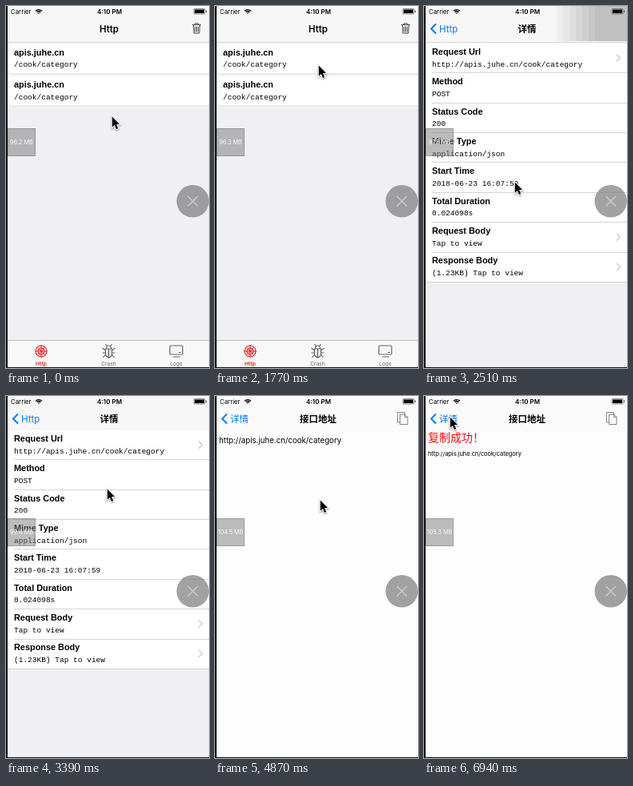
Write an HTML page with a canvas that moves like this. It is 254 px wide and 453 px high and loops after 7.99 s.

```html
<!DOCTYPE html>
<html lang="zh">
<head>
<meta charset="utf-8">
<title>Http inspector</title>
<style>
html, body { margin: 0; width: 100%; height: 100%; overflow: hidden; background: #000; }
canvas { display: block; width: 254px; height: 453px; }
</style>
</head>
<body>
<canvas></canvas>
<script>
const W = 254, H = 453, LOOP = 7990, STEP = 147.8;
const canvas = document.querySelector('canvas');
const c = canvas.getContext('2d');
const ratio = Math.max(1, window.devicePixelRatio || 1);
canvas.width = W * ratio;
canvas.height = H * ratio;

const UI = 'Inter, "Noto Sans CJK SC", "Noto Sans CJK", sans-serif';
const BOLD = 'bold 10.9px "Liberation Sans", sans-serif';
const MONO = '9.5px "Liberation Mono", monospace';
const BLUE = '#007aff', RED = '#e3261c', GRAY = '#666', LINE = '#d5d5d8';
const url = 'http://apis.juhe.cn/cook/category';

const details = [
  ['Request Url', url, true],
  ['Method', 'POST'],
  ['Status Code', '200'],
  ['Mime Type', 'application/json'],
  ['Start Time', '2018-06-23 16:07:59'],
  ['Total Duration', '0.024098s'],
  ['Request Body', 'Tap to view', true],
  ['Response Body', '(1.23KB) Tap to view', true]
];

// Places the pointer visits, as [step, x, y].
const stops = [
  [-1, 132, 137], [5, 46, 66], [11, 129, 73], [12, 129, 73], [16, 113, 219],
  [22, 126, 115], [27, 139, 66], [32, 131, 129], [39, 231, 28], [46, 32, 25]
];

const ramp = (k, from, to) => Math.max(0, Math.min(1, (k - from) / (to - from)));
const smooth = f => f * f * (3 - 2 * f);
const push = (k, start) => 1 - (1 - ramp(k, start, start + 3)) ** 2;

// Dragged up, then springing back to rest.
const scrollAt = k => Math.round(Math.max(0, Math.min(12 * (k - 17), 16 * 2 ** (20 - k))));

const memoryAt = k => 96.2 + .1 * ramp(k, 0, 4) + 3.1 * ramp(k, 12, 20)
  + 5.1 * ramp(k, 24, 32) + .8 * ramp(k, 36, 42);

function pointerAt(k) {
  const i = Math.max(1, stops.findIndex(stop => stop[0] >= k));
  const [from, x, y] = stops[i - 1], [to, nextX, nextY] = stops[i];
  const f = smooth(ramp(k, from, to));
  return [x + (nextX - x) * f, y + (nextY - y) * f];
}

function rect(x, y, w, h, color) {
  c.fillStyle = color;
  c.fillRect(x, y, w, h);
}

function text(str, x, y, font, color = '#000', align = 'left') {
  c.font = font;
  c.fillStyle = color;
  c.textAlign = align;
  c.fillText(str, x, y);
}

function stroke(path, color, width = 1) {
  c.strokeStyle = color;
  c.lineWidth = width;
  c.stroke(new Path2D(path));
}

function box(x, y, w, h, radius, color, width = 1) {
  c.strokeStyle = color;
  c.lineWidth = width;
  c.beginPath();
  c.roundRect(x, y, w, h, radius);
  c.stroke();
}

function arc(x, y, r, from, to, color, width) {
  c.strokeStyle = color;
  c.lineWidth = width;
  c.beginPath();
  c.arc(x, y, r, from, to);
  c.stroke();
}

function group(x, y, alpha, paint) {
  c.save();
  c.translate(x, y);
  c.globalAlpha *= alpha;
  paint();
  c.restore();
}

function radarIcon(color) {
  for (const r of [7, 4]) arc(0, 0, r, 0, 7, color, 1.2);
  for (let i = 0; i < 8; i++) {
    c.rotate(Math.PI / 4);
    stroke(i % 2 ? 'M0 0H8' : 'M0 0H5', color);
  }
}

function bugIcon(color) {
  for (const side of [1, -1]) {
    c.save();
    c.scale(side, 1);
    stroke('M0-3H4V3Q4 7 0 8V-3M0-7Q3-7 3-3M2-6L4-9M4-1L8-4M4 2H8M4 4L7 8', color, 1.2);
    c.restore();
  }
}

function screenIcon(color) {
  box(-8, -7, 16, 11, 1, color, 1.2);
  stroke('M-4 7H5M3 1.5H6', color, 1.2);
}

function trashIcon() {
  stroke('M233 23.5H244M236.5 23V21.8H240.5V23M234.5 24L235 34H242L242.5 24', '#4a4a4a');
  for (let x = 236.6; x < 241; x += 1.9) stroke(`M${x} 25.5V32.5`, '#4a4a4a');
}

function copyIcon() {
  stroke('M231.5 23H237.5L241 26.5V35.5H231.5ZM237.5 23V26.5H241M231 33H228.5V20.5H237.5V23', '#666', .8);
}

function tab(x, label, color, weight, icon) {
  group(x, 432, 1, () => icon(color));
  text(label, x, 449.5, `${weight} 6.7px ${UI}`, color, 'center');
}

function row(y, title, detail, arrow) {
  text(title, 10, y + 14.5, BOLD);
  text(detail, 10, y + 29, MONO);
  if (arrow) stroke(`M241 ${y + 14}l4.5 4.5-4.5 4.5`, '#c4c4c9', 1.2);
}

function listPage() {
  rect(0, 0, W, H, '#efeff4');
  rect(0, 45, W, 1, LINE);
  for (const y of [47, 87.5]) {
    rect(0, y, W, 37, '#fff');
    rect(0, y + 37, W, 1, '#e6e6e8');
    row(y, 'apis.juhe.cn', '/cook/category');
  }
  rect(0, 418, W, 35, '#f8f8f8');
  rect(0, 418, W, 1, '#bcbcbe');
  tab(44, 'Http', RED, 600, radarIcon);
  tab(128.5, 'Crash', GRAY, 400, bugIcon);
  tab(213, 'Logs', GRAY, 400, screenIcon);
}

function detailPage(offset) {
  const top = 46.5 - offset, height = 37.35;
  rect(0, 0, W, H, '#efeff4');
  rect(0, top - .5, W, height * 8, '#fff');
  rect(0, top - 1.5, W, 1, LINE);
  details.forEach((item, i) => {
    const y = top + height * i;
    row(y, ...item);
    rect(i < 7 ? 10 : 0, Math.round(y + height - .45), W, 1, LINE);
  });
}

function urlPage(copied) {
  rect(0, 0, W, H, '#fdfdfd');
  if (copied) text('复制成功！', 5, 57, `500 14px ${UI}`, '#fb0d0d');
  text(url, 5, copied ? 75 : 58.5, `${copied ? 7.4 : 9.7}px ${UI}`);
}

function navItems(title, back, icon, shift, alpha) {
  group(0, 0, alpha, () => {
    text(title, 129 + shift, 32.5, `600 11.5px ${UI}`, '#000', 'center');
    if (back) {
      stroke('M15 22.5L9 28.5L15 34.5', BLUE, 2);
      text(back, 19 + shift * .4, 32.5, `11.5px ${UI}`, BLUE);
    }
    if (icon) icon();
  });
}

function navBar(push1, push2) {
  rect(0, 0, W, 45, 'rgba(251,251,251,.7)');
  navItems('Http', '', trashIcon, -100 * push1, 1 - push1);
  navItems('详情', 'Http', null, 110 * (1 - push1) - 100 * push2, push1 * (1 - push2));
  navItems('接口地址', '详情', copyIcon, 110 * (1 - push2), push2);
}

// Stepped shade left in the bar while the page settles.
function navShade() {
  for (let x = 166; x < 220; x += 8) rect(x, 0, W - x, 44, 'rgba(0,0,0,.034)');
}

function statusBar() {
  text('Carrier', 6, 9.8, `7.8px ${UI}`);
  for (const r of [1, 3.2, 5.4]) arc(41, 10, r, -2.4, -.74, '#000', 1.4);
  text('4:10 PM', 129.5, 9.8, `600 8px ${UI}`, '#000', 'center');
  box(235, 3.5, 14, 6.5, 1, '#555', .7);
  rect(236, 4.5, 12, 4.5, '#000');
  rect(250, 5.5, 1, 2.5, '#555');
}

function overlays(k) {
  rect(2, 153, 35, 35, 'rgba(128,128,128,.53)');
  box(2.5, 153.5, 34, 34, 0, 'rgba(110,110,110,.4)');
  text(memoryAt(k).toFixed(1) + ' MB', 19.5, 173.2, `7.3px ${UI}`, '#f8f8f8', 'center');
  c.fillStyle = 'rgba(128,128,128,.73)';
  c.beginPath();
  c.arc(233.7, 244.3, 20.3, 0, 7);
  c.fill();
  stroke('M227.5 238L240 250.5M240 238L227.5 250.5', '#c8c8c8', 1.6);
}

function pointer(x, y) {
  group(x + .8, y + 1.5, 1, () => {
    const shape = new Path2D('M0 0V13.2L3 10.4L5.2 15.5L7.4 14.6L5.3 9.6H9.3Z');
    c.shadowColor = 'rgba(0,0,0,.45)';
    c.shadowBlur = 2 * ratio;
    c.shadowOffsetY = ratio;
    c.strokeStyle = '#fff';
    c.lineWidth = 2;
    c.stroke(shape);
    c.shadowColor = 'transparent';
    c.fillStyle = '#000';
    c.fill(shape);
  });
}

function draw(time) {
  const k = Math.max(-1, Math.min(46, Math.floor((time % LOOP - 120) / STEP)));
  const push1 = push(k, 12), push2 = push(k, 28);
  c.setTransform(ratio, 0, 0, ratio, 0, 0);

  if (push1 < 1) group(-76 * push1, 0, 1, listPage);
  if (push1 > 0 && push2 < 1)
    group(W * (1 - push1) - 76 * push2, 0, 1, () => detailPage(scrollAt(k)));
  if (push2 > 0) group(W * (1 - push2), 0, 1, () => urlPage(k >= 41));

  navBar(push1, push2);
  if (k >= 14 && k <= 17) navShade();
  statusBar();
  overlays(k);
  rect(0, 0, 2, H, '#141414');
  rect(0, 452, W, 1, '#141414');
  pointer(...pointerAt(k));
}

function loop() {
  draw(performance.now());
  requestAnimationFrame(loop);
}
loop();
</script>
</body>
</html>
```
